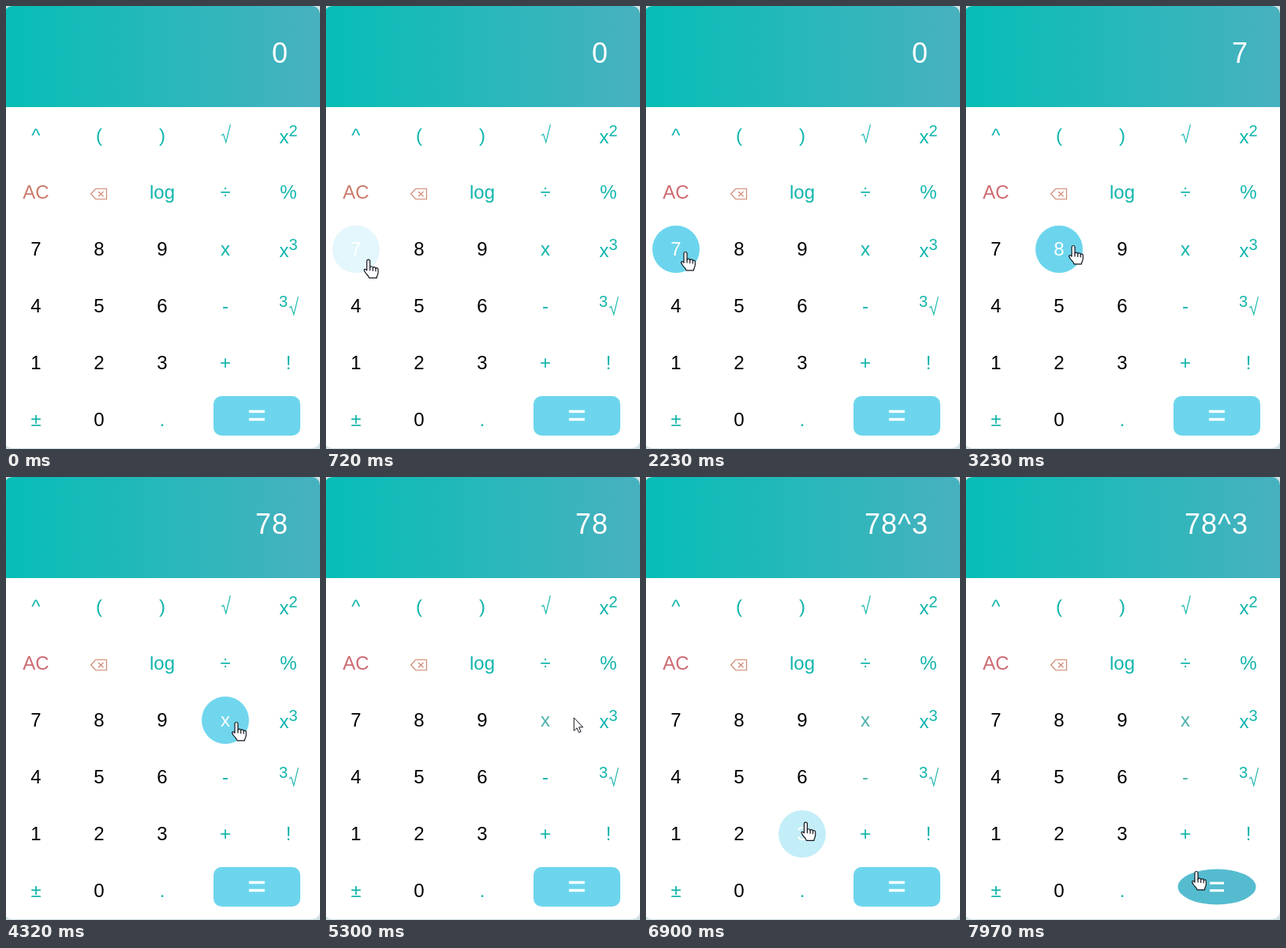
Write an HTML page that moves like this. It is 398 px wide and 561 px high and loops after 8000 ms.

```html
<!DOCTYPE html>
<html lang="en">
<head>
<meta charset="utf-8">
<title>Calculator</title>
<style>
  html, body { margin: 0; width: 100%; height: 100%; overflow: hidden; background: #d0e1e5; }
  svg { display: block; width: 398px; height: 561px; }
  text { font-family: "Liberation Sans", Arial, sans-serif; font-size: 24px; text-anchor: middle; }
</style>
</head>
<body>
<svg id="stage" viewBox="0 0 398 561">
  <defs>
    <linearGradient id="sky"><stop stop-color="#06beb6"/><stop offset="1" stop-color="#48b1bf"/></linearGradient>
    <clipPath id="card"><rect x="-2" width="400" height="560" rx="10"/></clipPath>
  </defs>
  <g clip-path="url(#card)">
    <rect x="-2" width="400" height="560" fill="#fff"/>
    <rect x="-2" width="400" height="128" fill="url(#sky)"/>
  </g>
  <text id="out" x="358" y="72" fill="#fff" style="font-size:36px;letter-spacing:1px;text-anchor:end">0</text>
  <g id="keys"></g>
  <g id="hand" fill="#fff" stroke="#15151f" stroke-width="1.2" stroke-linejoin="round" stroke-linecap="round">
    <path d="M-2 13.2V1.5a2 2 0 0 1 4 0V9.5C2.5 7.5 5.5 7.7 5.7 9.8C6.5 8.4 9 8.7 9.2 10.6C10 9.6 12.3 10 12.3 12V16C12.3 18.5 10.6 19.5 10.4 22.8H1C.8 20.5-2 18.5-3.5 16.5L-5.3 13.4C-6 11.6-3.8 10.8-2 13.2Z"/>
    <path d="M2 9.5V13M5.7 10V13.5M9.2 11V14" fill="none"/>
  </g>
  <path id="arrow" d="M0 0V16.5L3.8 13L6.3 18.7L8.8 17.6L6.4 12H11.5Z" fill="#fff" stroke="#15151f"/>
</svg>
<script>
const LOOP = 8000, FADE = 270, PRESS = 120;
const TEAL = '#10b5ad', DULL = '#4db3ac', SKY = [108, 213, 237], DEEP = [85, 188, 207];
const NS = 'http://www.w3.org/2000/svg';
const $ = id => document.getElementById(id);
const clamp = v => Math.max(0, Math.min(1, v));
const smooth = v => v * v * (3 - 2 * v);
const mix = (a, b, k) => a + (b - a) * k;

function add(parent, tag, attrs, text) {
  const el = document.createElementNS(NS, tag);
  for (const k in attrs) el.setAttribute(k, attrs[k]);
  if (text) el.textContent = text;
  parent.appendChild(el);
  return el;
}

const rows = [
  ['^', '(', ')', '√', 'x2'],
  ['AC', 'del', 'log', '÷', '%'],
  ['7', '8', '9', 'x', 'x3'],
  ['4', '5', '6', '-', '3√'],
  ['1', '2', '3', '+', '!'],
  ['±', '0', '.']
];
const keys = {};

function root(g, x, y) {
  add(g, 'path', {
    d: `M${x} ${y}l2.6-1.6 3.2 10.2 5.6-22.4`,
    fill: 'none', stroke: 'currentColor', 'stroke-width': 1.1
  });
}

function drawLabel(g, name, x, y) {
  const label = (dx, dy, s) => add(g, 'text', { x: x + dx, y: y + dy, fill: 'currentColor' }, s);
  if (name === '√') root(g, x - 5, y);
  else if (name === '3√') {
    label(-6.5, 1, '3').style.fontSize = '20px';
    root(g, x + 1, y + 2);
  } else if (name === 'x2' || name === 'x3') {
    const t = label(0, 10, 'x');
    add(t, 'tspan', { dy: -9, style: 'font-size:20px' }, name[1]);
  } else if (name === 'del') {
    add(g, 'path', {
      d: 'M107.7 238L113.5 231.5H127.5V244.5H113.5ZM117 235L123.5 241.3M123.5 235L117 241.3',
      fill: 'none', stroke: 'currentColor', 'stroke-width': 1.2
    });
  } else label(0, 8, name);
}

rows.forEach((row, r) => row.forEach((name, c) => {
  const x = 38 + 80 * c, y = r ? 164 + 72 * r : 164;
  const g = add($('keys'), 'g', {});
  const disc = add(g, 'circle', { cx: x, cy: y, r: 30, fill: `rgb(${SKY})`, opacity: 0 });
  drawLabel(g, name, x, y);
  const color = /^\d$/.test(name) ? '#000' : name === 'AC' ? '#cd7b6b' : name === 'del' ? '#d08872' : TEAL;
  keys[name] = { g, disc, x, y, color };
}));
keys.AC.worn = '#cf6a72';
keys.x.worn = keys['-'].worn = DULL;

const eq = add($('keys'), 'g', {});
const pill = add(eq, 'rect', { x: 263, y: 494, width: 110, height: 50 });
add(eq, 'text', { x: 318, y: 532, fill: '#fff', stroke: '#fff', 'stroke-width': .6, style: 'font-size:40px' }, '=');
keys['='] = { g: eq, x: 318, y: 519 };

// [start, end, x, y, bend x, bend y]: curve from the previous place
const START = [171, 436];
const moves = [
  [390, 760, 50, 318],
  [1070, 1490, 44, 262, 107, 305],
  [1490, 1820, 59, 329, 36, 240],
  [1870, 2200, 50, 312],
  [2720, 3230, 136, 304],
  [3770, 4220, 292, 311],
  [4610, 4710, 308, 305],
  [5230, 5540, 355, 304],
  [6300, 6920, 202, 438],
  [7110, 7520, 292, 489],
  [7850, 7960, 292, 500]
];
// [key, enter, leave]
const hovers = [
  ['5', 512, 605], ['7', 670, 1170], ['AC', 1466, 1665], ['7', 1890, 2868],
  ['8', 2955, 3844], ['9', 3898, 4022], ['x', 4060, 4660], ['x3', 5370, 6450],
  ['-', 6560, 6685], ['3', 6792, 7258], ['=', 7390, LOOP]
];
// [key, down, up]
const presses = [['7', 2500, 2630], ['8', 3580, 3700], ['x3', 5770, 5890], ['=', 7845, LOOP]];
const readings = [[0, '0'], [2630, '7'], [3700, '78'], [5890, '78^3']];

function pointer(t) {
  let [x, y] = START;
  for (const [a, b, ex, ey, bx = (x + ex) / 2, by = (y + ey) / 2] of moves) {
    if (t < a) break;
    const u = smooth(clamp((t - a) / (b - a))), v = 1 - u;
    x = v * v * x + 2 * u * v * bx + u * u * ex;
    y = v * v * y + 2 * u * v * by + u * u * ey;
  }
  return [x, y];
}

function draw(t) {
  const over = hovers.find(h => t >= h[1] && t < h[2]);
  const glow = over ? clamp((t - over[1]) / FADE) : 0;

  for (const name in keys) {
    const k = keys[name], on = over && over[0] === name;
    const p = presses.find(p => p[0] === name && t >= p[1]);
    const dip = p ? clamp((t - p[1]) / PRESS) - clamp((t - p[2]) / PRESS) : 0;
    const s = 1 - .1 * dip;
    k.g.setAttribute('transform', `translate(${k.x} ${k.y}) scale(${s}) translate(${-k.x} ${-k.y})`);
    if (!k.disc) continue;
    const worn = k.worn && hovers.some(h => h[0] === name && t >= h[2]);
    k.disc.setAttribute('opacity', on ? glow : 0);
    k.g.setAttribute('color', on ? '#fff' : worn ? k.worn : k.color);
  }

  const e = over && over[0] === '=' ? glow : 0;
  pill.setAttribute('rx', mix(10, 55, e));
  pill.setAttribute('ry', mix(10, 25, e));
  pill.setAttribute('fill', `rgb(${SKY.map((c, i) => Math.round(mix(c, DEEP[i], e)))})`);

  $('out').textContent = readings.filter(r => t >= r[0]).pop()[1];

  const at = `translate(${pointer(t)})`;
  for (const [id, show] of [['hand', over], ['arrow', !over && t >= 390]]) {
    $(id).setAttribute('transform', at);
    $(id).setAttribute('visibility', show ? 'visible' : 'hidden');
  }
}

const t0 = performance.now();
function tick() {
  draw((performance.now() - t0) % LOOP);
  requestAnimationFrame(tick);
}
tick();
</script>
</body>
</html>
```
